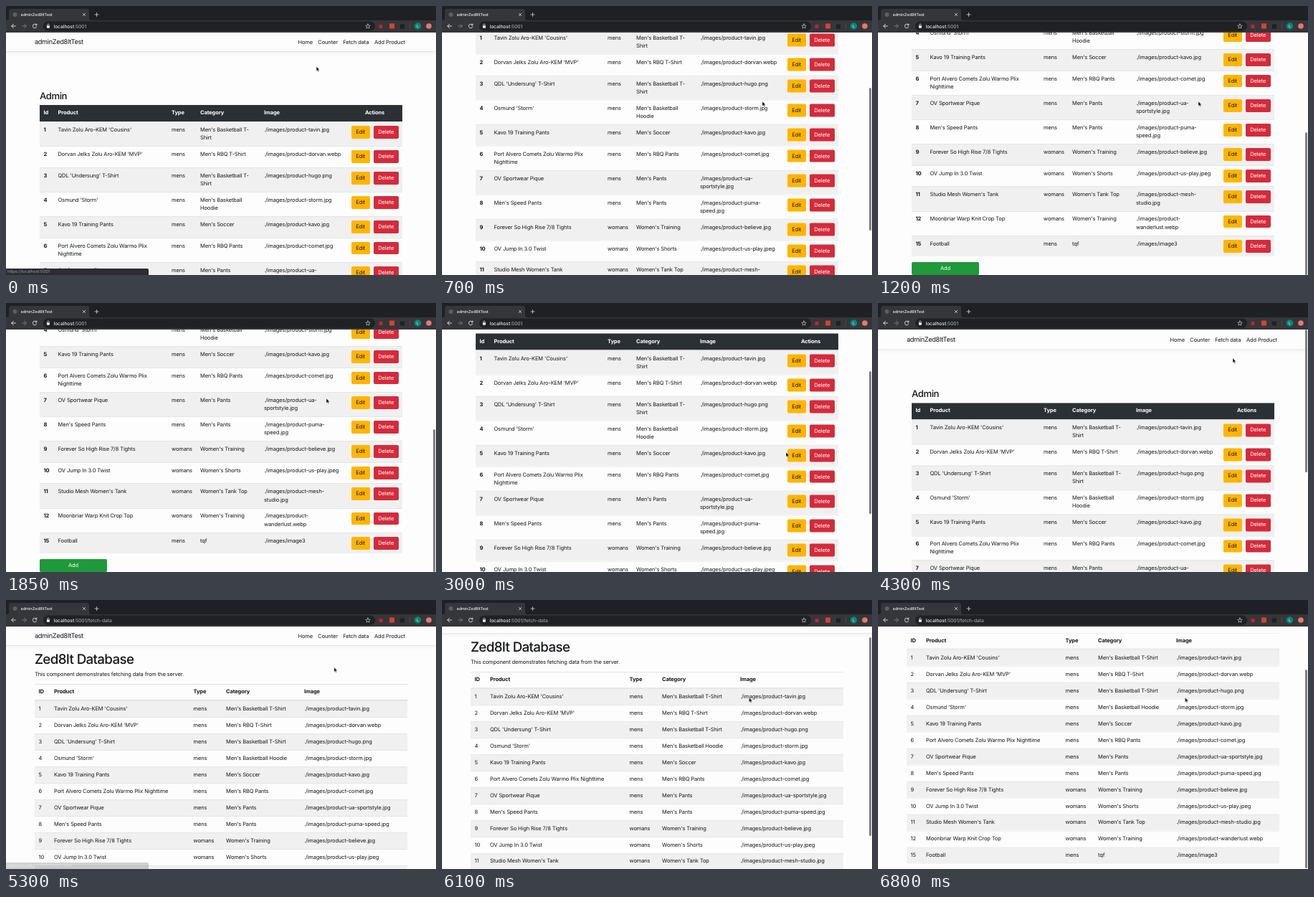
Recreate the animation shown at these times as an HTML page. Size 600 by 375 pixels, loop 6850 ms.

```html
<!DOCTYPE html>
<html lang="en">
<head>
<meta charset="utf-8">
<title>Product admin</title>
<style>
@property --s { syntax: "<number>"; inherits: true; initial-value: 0; }

html, body { margin: 0; width: 100%; height: 100%; overflow: hidden; }
#stage {
  position: relative; width: 600px; height: 375px; overflow: hidden; background: #fdfdfd;
  font: 7.5px/11.25px Inter, "Open Sans", sans-serif; letter-spacing: -.12px;
  color: #14171a; white-space: nowrap; text-rendering: geometricPrecision;
  animation: scroll 6850ms infinite;
}
#stage * { box-sizing: border-box; }
.abs, .view, .page, .thumb, .table { position: absolute; }
.view, .page { left: 0; top: 0; width: 600px; height: 375px; }
.page { transform: translateY(calc(var(--s) * -1px)); }

/* page header and headings */
.nav {
  position: absolute; left: 0; top: 37px; width: 600px; height: 26.5px;
  border-bottom: 1px solid #e3e5e7; box-shadow: 0 2px 6px rgba(0, 0, 0, .05);
}
.nav span { position: absolute; top: 7.7px; }
.nav .brand { left: 40px; font-size: 9.2px; letter-spacing: -.33px; }
h1, h3 { position: absolute; margin: 0; font-weight: 500; }
h1 { left: 40px; top: 71px; font-size: 18.75px; line-height: 24px; letter-spacing: -.65px; }
h3 { left: 47px; top: 118px; font-size: 13.1px; line-height: 17px; letter-spacing: -.4px; }

/* tables */
.row { display: grid; position: relative; }
.row > * { padding: 5.8px 0 0 5.5px; }
.row:nth-child(even) { background: #f0f0f0; }
.row:not(.head) { box-shadow: inset 0 1px #e3e5e8; }
.head { font-weight: 700; }

.admin { left: 47px; top: 137.5px; width: 506px; }
.admin .row { grid-template-columns: 20px 158.5px 40px 89px 121.5px 77px; height: 29.53px; }
.admin .row.tall { height: 34.22px; }
.admin .row.head { height: 23.6px; background: #2b3035; color: #fff; }
.admin .row > :first-child { font-weight: 700; }
.admin .head > :last-child { padding-left: 0; text-align: center; }
.btn {
  position: absolute; top: 5.9px; height: 17.8px; border-radius: 1.9px; padding: 0;
  line-height: 17.8px; text-align: center; color: #fff;
}
.edit { left: 435px; width: 25.5px; background: #ffb500; color: #14171a; }
.delete { left: 466px; width: 34.5px; background: #d42b3b; }
.add { left: 47px; top: 589.8px; width: 94px; background: #20993b; }

.data { left: 40px; top: 116.5px; width: 520px; }
.data .row { grid-template-columns: 21.5px 194.5px 45.5px 109px 149.5px; height: 22.97px; }
.data .row.head { height: 23.5px; box-shadow: inset 0 1px #dfe2e5, inset 0 -1px #dfe2e5; }

.thumb {
  left: 595.8px; top: calc(38px + var(--s) * .592px); width: 3.6px; height: 198.5px;
  border-radius: 2px; background: #7f7f7f;
}
.thumb.long { top: calc(38px + var(--s) * .82px); height: 277px; }

/* browser frame */
.chrome { left: 0; top: 0; }
.chrome text { fill: #e8eaed; font-weight: 500; letter-spacing: -.05px; }
.chrome .dim { fill: #9aa0a6; }
.bubble {
  left: 0; top: 365.5px; width: 199px; height: 10px; padding-left: 2px;
  border-radius: 0 2px 0 0; background: #2b2d31; color: #969ba1;
  font-size: 5.8px; line-height: 10px; letter-spacing: 0;
}
.cursor { left: 0; top: 0; overflow: visible; }

/* motion */
#view1 { animation: leave 6850ms step-end infinite; }
#view2, .path { animation: enter 6850ms step-end infinite; }
.hover { animation: link 6850ms step-end infinite; }
.thumb { animation: thumb 6850ms linear infinite; }
.thumb.long { animation-name: thumb2; }
.bubble { animation: bubble 6850ms linear infinite; }
.cursor { animation: cursor 6850ms ease-in-out infinite; }

/* each swipe speeds up under the fingers, then coasts to rest */
@keyframes scroll {
  0%, 5.1% { --s: 0; animation-timing-function: ease-in; }
  10.22% { --s: 128; animation-timing-function: ease-out; }
  16%, 32.8% { --s: 233; animation-timing-function: ease-in; }
  36.5% { --s: 165; animation-timing-function: ease-out; }
  41.6%, 51.1% { --s: 95.5; animation-timing-function: ease-in; }
  55% { --s: 45; animation-timing-function: ease-out; }
  60.6% { --s: -3; animation-timing-function: ease-in-out; }
  62.77% { --s: -1.5; animation-timing-function: ease-out; }
  64.5%, 86.9% { --s: 0; animation-timing-function: ease-in; }
  89.05% { --s: 16.5; animation-timing-function: ease-out; }
  95%, 100% { --s: 71.5; }
}
@keyframes leave { 0% { visibility: visible; } 72.2%, 100% { visibility: hidden; } }
@keyframes enter { 0% { visibility: hidden; } 72.2%, 100% { visibility: visible; } }
@keyframes link { 0% { visibility: hidden; } 40%, 100% { visibility: inherit; } }
@keyframes thumb { 0%, 5.1% { opacity: 0; } 5.8%, 67% { opacity: 1; } 71%, 100% { opacity: 0; } }
@keyframes thumb2 { 0%, 86.9% { opacity: 0; } 87.6%, 100% { opacity: 1; } }
@keyframes bubble {
  0%, 2% { opacity: 1; }
  5%, 66.4% { opacity: 0; }
  68%, 75% { opacity: 1; }
  78%, 100% { opacity: 0; }
}
@keyframes cursor {
  0% { transform: translate(433px, 84px); animation-timing-function: ease-out; }
  4.4%, 37% { transform: translate(447px, 133px); }
  43%, 57.5% { transform: translate(480px, 208px); animation-timing-function: ease-in; }
  62.77% { transform: translate(495px, 77px); animation-timing-function: ease-out; }
  66.4%, 73.7% { transform: translate(488px, 50px); }
  81%, 100% { transform: translate(428.5px, 136px); }
}
</style>
</head>
<body>
<div id="stage">
  <div class="view" id="view1">
    <div class="page">
      <div class="nav"></div>
      <h3>Admin</h3>
      <div class="table admin"></div>
      <div class="btn add">Add</div>
    </div>
    <div class="thumb"></div>
  </div>
  <div class="view" id="view2">
    <div class="page">
      <div class="nav"></div>
      <h1>Zed8It Database</h1>
      <div class="abs" style="left:40px;top:98px">This component demonstrates fetching data from the server.</div>
      <div class="table data"></div>
    </div>
    <div class="thumb long"></div>
  </div>

  <div class="abs bubble">https://localhost:5001<span class="hover">/fetch-data</span></div>

  <svg class="abs chrome" width="600" height="37" fill="none" stroke-linecap="round">
    <path fill="#1f2023" d="M0 0H600V20H0z"/>
    <path fill="#35363a" d="M0 20H600V37H0zM1 20Q4 20 4 17V7Q4 4 7 4H113Q116 4 116 7V17Q116 20 119 20z"/>
    <circle cx="12.5" cy="12" r="3" fill="#5c6064"/>
    <text x="20.5" y="14" font-size="5.6">adminZed8ItTest</text>
    <g stroke="#d5d7da" stroke-width=".8">
      <path d="M107.3 10.3l3.4 3.4m0-3.4l-3.4 3.4M124 12h5m-2.5-2.5v5"/>
    </g>
    <rect x="52" y="21.5" width="463" height="13.5" rx="6.75" fill="#202124"/>
    <g stroke="#e8eaed" stroke-width=".9">
      <path d="M13.3 28H7.8m2.6-2.7L7.7 28l2.7 2.7"/>
      <path stroke="#808387" d="M22.7 28h5.5m-2.6-2.7l2.7 2.7-2.7 2.7"/>
      <path d="M42.4 26.3A2.8 2.8 0 1 0 42.8 28.8M42.8 25v1.8H41"/>
      <path stroke-width=".7" d="M57.6 27.5v-1.1a1.3 1.3 0 0 1 2.6 0v1.1"/>
      <path stroke-width=".6" d="M505 25l.9 2.1 2.3.2-1.7 1.5.5 2.3-2-1.2-2 1.2.5-2.3-1.7-1.5 2.3-.2z"/>
    </g>
    <rect x="56.9" y="27.3" width="4" height="3.4" rx=".4" fill="#e8eaed"/>
    <text x="66.5" y="30.6" font-size="6.7">localhost<tspan class="dim">:5001</tspan><tspan class="dim path">/fetch-data</tspan></text>
    <rect x="520.5" y="26" width="5" height="5" fill="#c4232b"/>
    <rect x="535" y="24.5" width="7" height="7" fill="#d8412f"/>
    <rect x="550" y="25.5" width="6" height="6" fill="#202124"/>
    <path stroke="#55585c" stroke-width=".6" d="M563.5 24v8"/>
    <circle cx="574.5" cy="28" r="4.7" fill="#00897b"/>
    <text x="574.5" y="30" font-size="5.4" text-anchor="middle">L</text>
    <circle cx="590" cy="28" r="3.8" fill="#e9776f"/>
  </svg>

  <svg class="abs cursor" width="6" height="9">
    <path d="M0 0V6.6L1.5 5.2 2.5 7.5 3.6 7 2.6 4.8H4.6Z" fill="#000" stroke="#fff" stroke-width=".5"/>
  </svg>
</div>

<script>
// "|" marks where a cell wraps in the narrower table
const products = [
  [1, "Tavin Zolu Aro-KEM 'Cousins'", "mens", "Men's Basketball T-|Shirt", "tavin.jpg"],
  [2, "Dorvan Jelks Zolu Aro-KEM 'MVP'", "mens", "Men's RBQ T-Shirt", "dorvan.webp"],
  [3, "QDL 'Undersung' T-Shirt", "mens", "Men's Basketball T-|Shirt", "hugo.png"],
  [4, "Osmund 'Storm'", "mens", "Men's Basketball |Hoodie", "storm.jpg"],
  [5, "Kavo 19 Training Pants", "mens", "Men's Soccer", "kavo.jpg"],
  [6, "Port Alvero Comets Zolu Warmo Plix |Nighttime", "mens", "Men's RBQ Pants", "comet.jpg"],
  [7, "OV Sportwear Pique", "mens", "Men's Pants", "ua-|sportstyle.jpg"],
  [8, "Men's Speed Pants", "mens", "Men's Pants", "puma-|speed.jpg"],
  [9, "Forever So High Rise 7/8 Tights", "womans", "Women's Training", "believe.jpg"],
  [10, "OV Jump In 3.0 Twist", "womans", "Women's Shorts", "us-play.jpeg"],
  [11, "Studio Mesh Women's Tank", "womans", "Women's Tank Top", "mesh-|studio.jpg"],
  [12, "Moonbriar Warp Knit Crop Top", "womans", "Women's Training", "|wanderlust.webp"],
  [15, "Football", "mens", "tqf", "image3"]
];
const links = [["Home", 407.5], ["Counter", 435.3], ["Fetch data", 470.3], ["Add Product", 514]];
const buttons = '<div class="btn edit">Edit</div><div class="btn delete">Delete</div>';

const cells = list => list.map(text => `<div>${text}</div>`).join("");
const row = (list, cls = "", extra = "") => `<div class="row ${cls}">${cells(list)}${extra}</div>`;
const withPath = ([id, name, type, category, file]) =>
  [id, name, type, category, "./images/" + (file === "image3" ? "" : "product-") + file];

function adminRow(list) {
  const wraps = list.some(text => String(text).includes("|"));
  return row(list.map(text => String(text).replace("|", "<br>")), wraps ? "tall" : "", buttons);
}
const dataRow = list => row(list.map(text => String(text).replace("|", "")));

const columns = ["Product", "Type", "Category", "Image"];
const items = products.map(withPath);
document.querySelector(".admin").innerHTML =
  row(["Id", ...columns, "Actions"], "head") + items.map(adminRow).join("");
document.querySelector(".data").innerHTML =
  row(["ID", ...columns], "head") + items.map(dataRow).join("");

for (const nav of document.querySelectorAll(".nav")) {
  nav.innerHTML = '<span class="brand">adminZed8ItTest</span>' +
    links.map(([text, x]) => `<span style="left:${x}px">${text}</span>`).join("");
}
</script>
</body>
</html>
```
